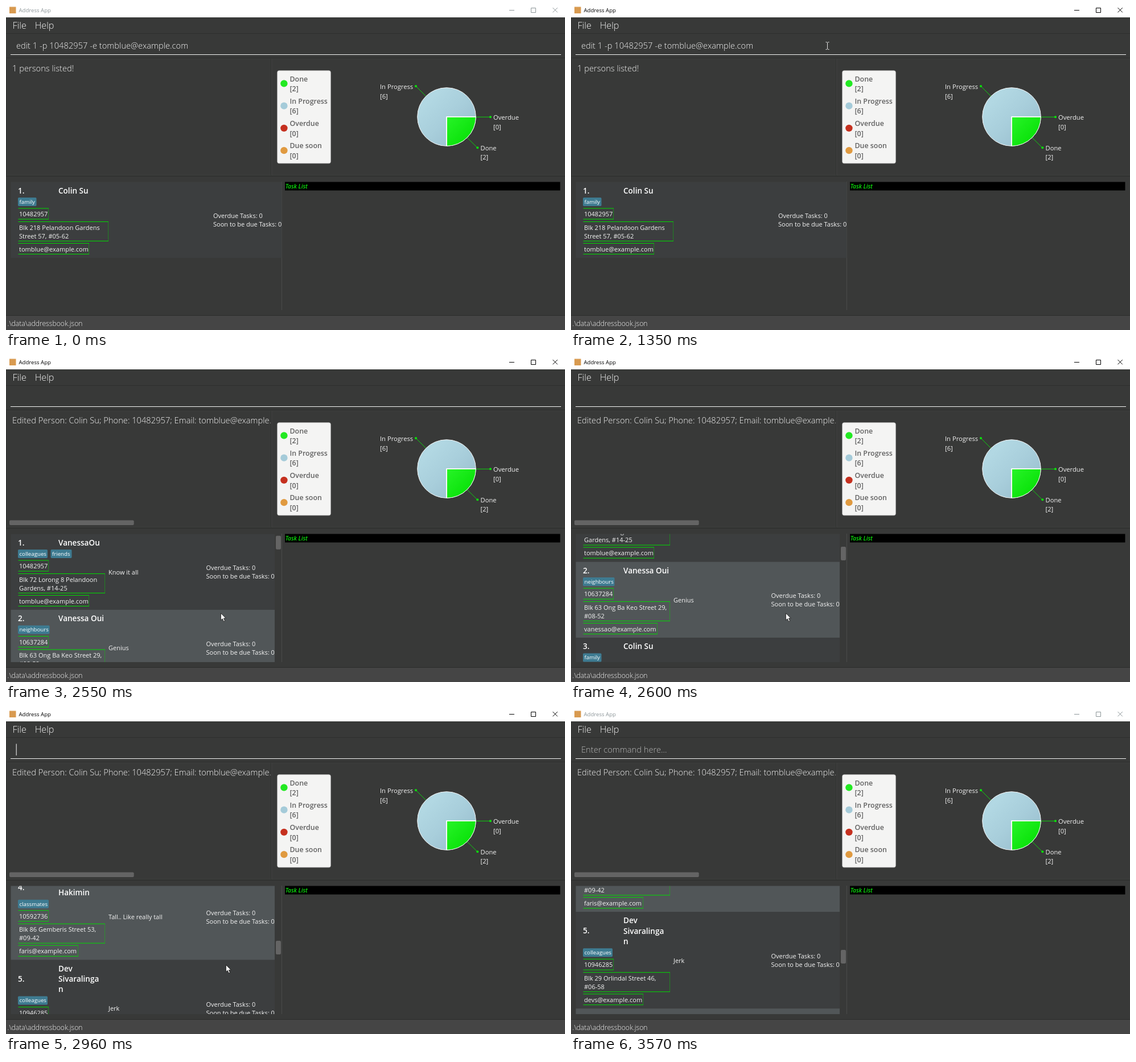
Write an HTML page that moves like this. It is 982 px wide and 570 px high and loops after 3670 ms.

```html
<!DOCTYPE html>
<html lang="en">
<head>
<meta charset="utf-8">
<title>Address App</title>
<style>
html, body { margin: 0; width: 100%; height: 100%; overflow: hidden; background: #383938; }
svg { display: block; width: 982px; height: 570px; font-family: "Open Sans", "Noto Sans", sans-serif; }
text { white-space: pre; }
.menu { font-size: 16.2px; font-weight: 300; fill: #f4f4f4; }
.line { font-size: 14.7px; font-weight: 300; fill: #f4f4f4; }
.name { font-size: 13.55px; font-weight: 600; fill: #fff; }
.small { font-size: 11px; fill: #f4f4f4; }
.tag { font-size: 9.7px; fill: #fff; }
.legend { font-size: 12.4px; font-weight: 600; fill: #626262; }
.label { font-size: 11.2px; fill: #f2f2f2; }
.edge { fill: none; stroke: #00dc00; }
</style>
</head>
<body>
<svg id="stage" viewBox="0 0 982 570"></svg>
<script>
const LOOP = 3670;
const CARET_STEP = 84.4;
const LIME = '#0be40b';

const text = (x, y, cls, s, extra = '') => `<text x="${x}" y="${y}" class="${cls}" ${extra}>${s}</text>`;
const rect = (x, y, w, h, fill, extra = '') =>
  `<rect x="${x}" y="${y}" width="${w}" height="${h}" fill="${fill}" ${extra}/>`;
const dot = (x, y, r, fill) => `<circle cx="${x}" cy="${y}" r="${r}" fill="${fill}"/>`;
const group = (id, body, extra = '') => `<g id="${id}" ${extra}>${body}</g>`;

const PHONE = '10482957', MAIL = 'tomblue@example.com', PERSON = 'Colin Su';

const people = [
  { name: ['VanessaOu'], tags: [['colleagues', 52], ['friends', 37]], phone: PHONE,
    home: ['Blk 72 Lorong 8 Pelandoon', 'Gardens, #14-25'], mail: MAIL, mailEnd: 146, note: 'Know it all' },
  { name: ['Vanessa Oui'], tags: [['neighbours', 55.5]], phone: '10637284',
    home: ['Blk 63 Ong Ba Keo Street 29,', '#08-52'], mail: 'vanessao@example.com', mailEnd: 152, note: 'Genius' },
  { name: [PERSON], tags: [['family', 32.5]], phone: PHONE,
    home: ['Blk 218 Pelandoon Gardens', 'Street 57, #05-62'], mail: MAIL, mailEnd: 146, note: '' },
  { name: ['Faris', 'Hakimin'], tags: [['classmates', 54]], phone: '10592736',
    home: ['Blk 86 Gemberis Street 53,', '#09-42'], mail: 'faris@example.com', mailEnd: 127, note: 'Tall.. Like really tall' },
  { name: ['Dev', 'Sivaralinga', 'n'], tags: [['colleagues', 52]], phone: '10946285',
    home: ['Blk 29 Orlindal Street 46,', '#06-58'], mail: 'devs@example.com', mailEnd: 127, note: 'Jerk' }
];

const cardHeight = p => 133.5 + 18.2 * (p.name.length - 1);

// Field with bright top and bottom rules and a faint right side
function field(y, h, end) {
  return `<path class="edge" d="M21.5 ${y}H${end}M21.5 ${y + h}H${end}"/>` +
    `<path class="edge" stroke-opacity=".55" stroke-width=".8" d="M${end - .4} ${y}V${y + h}"/>`;
}

function card(p, index, top, wide) {
  const h = cardHeight(p), gap = h - 133.5, mid = h / 2;
  const statX = wide ? 364 : 351.5;
  let s = rect(8.5, 0, wide ? 476 : 463.5, h, index % 2 ? '#515658' : '#3c3e3f');
  s += text(21, 20 + gap / 2, 'name', index + 1 + '.');
  p.name.forEach((part, i) => s += text(92, 20 + i * 18.3, 'name', part));
  let x = 21;
  for (const [label, w] of p.tags) {
    s += rect(x, 27.5 + gap, w, 15, '#3e7b91', 'rx="1.7"') + text(x + 2.5, 38.3 + gap, 'tag', label);
    x += w + 5.5;
  }
  const row = (y, str) => text(23, y + gap, 'small', str);
  s += field(46.5 + gap, 19, 75) + row(60.5, p.phone);
  s += field(70 + gap, 34, wide ? 180 : 174) + row(84, p.home[0]) + row(99, p.home[1]);
  s += field(108 + gap, 19, p.mailEnd) + row(122, p.mail);
  s += text(180, mid + 4.5, 'small', p.note);
  s += text(statX, mid - 3, 'small', 'Overdue Tasks: 0');
  s += text(statX, mid + 12, 'small', 'Soon to be due Tasks: 0');
  return `<g transform="translate(0 ${top})">${s}</g>`;
}

function allCards() {
  let y = 0, s = '';
  people.forEach((p, i) => { s += card(p, i, y, false); y += cardHeight(p); });
  return s + rect(8.5, y, 463.5, 133, '#515658');
}

function legend() {
  const rows = [['Done', 2, '#22e922'], ['In Progress', 6, '#a5cbd9'], ['Overdue', 0, '#c5301f'], ['Due soon', 0, '#e09a40']];
  return rect(476.7, 113.8, 93.6, 163, '#f4f4f3', 'rx="3" stroke="#c9c9c9" stroke-width=".8"') +
    rows.map(([name, n, color], i) => {
      const y = i * 39.25;
      return dot(488.4, 136.4 + y, 6.2, color) + text(498.5, 132.6 + y, 'legend', name) +
        text(498.5, 150 + y, 'legend', `[${n}]`);
    }).join('');
}

function pie() {
  const label = (x, y, name, n) => text(x, y, 'label', name) + text(x, y + 16.6, 'label', `[${n}]`);
  return `<path d="M737.5 158.5L720 141M826 195.3H851M810 231.5L828 249.3" stroke="${LIME}" stroke-width=".9" fill="none"/>` +
    dot(720, 141, 2, LIME) + dot(851, 195.3, 2, LIME) + dot(828.3, 249.3, 2, LIME) +
    `<circle cx="774" cy="195" r="51.3" fill="url(#blue)" stroke="#f4f4f4"/>` +
    `<path d="M774 195H825.3A51.3 51.3 0 0 1 774 246.3Z" fill="url(#green)" stroke="#f4f4f4"/>` +
    `<path d="M825 195H774V246" fill="none" stroke="#fff" stroke-width="1.7"/>` +
    label(657, 146, 'In Progress', 6) + label(856, 200.2, 'Overdue', 0) + label(833.5, 253.7, 'Done', 2);
}

const defs = `<defs>
  <linearGradient id="blue" x1="0" y1="0" x2="1" y2="1">
    <stop offset=".2" stop-color="#b2d8e3"/><stop offset=".52" stop-color="#a8cedb"/><stop offset=".9" stop-color="#98bdcd"/>
  </linearGradient>
  <linearGradient id="green" x1="0" y1="0" x2="1" y2="1">
    <stop offset="0" stop-color="#27f427"/><stop offset="1" stop-color="#00dc00"/>
  </linearGradient>
  <clipPath id="listClip"><rect x="8" y="309.5" width="477" height="225.5"/></clipPath>
  <clipPath id="resultClip"><rect x="0" y="93" width="464.5" height="200"/></clipPath>
</defs>`;

document.getElementById('stage').innerHTML = defs +
  rect(0, 0, 982, 570, '#383938') +
  rect(0, 0, 982, 20, '#fff') +
  rect(6, 1.5, 11.5, 11.5, '#d89a50') +
  group('chrome', text(22.5, 10.8, '', 'Address App', 'font-size="9.6" stroke="none" fill="currentColor"') +
    '<path d="M884 7.5H893M922.5 3.5H930.5V11.5H922.5ZM960.5 3L968.8 11.3M968.8 3L960.5 11.3" fill="none" stroke="currentColor"/>') +
  text(11.5, 40, 'menu', 'File') + text(50.7, 40, 'menu', 'Help') +
  rect(0, 48, 982, 1, '#2e2f2e') + rect(8, 85, 967, 1, '#f4f4f4') +
  rect(0, 91, 982, 1.5, '#2d2e2d') + rect(0, 92.5, 982, .8, '#434443') +
  rect(0, 297.5, 982, 1, '#434443') + rect(0, 298.5, 982, 1.5, '#2d2e2d') +
  rect(0, 93, 1, 205, '#2f302f') + rect(465.5, 93, 1, 205, '#2d2e2d') + rect(466.5, 93, .8, 205, '#484948') +
  group('command', text(18, 75.3, 'line', `edit 1 -p ${PHONE} -e ${MAIL}`)) +
  group('prompt', text(18, 75.3, 'line', 'Enter command here...', 'fill-opacity=".68"')) +
  rect(0, 59.5, 1.2, 20.5, '#dcdcdc', 'id="caret"') +
  group('found', text(11, 114.5, 'line', '1 persons listed!')) +
  group('edited', text(11, 114.5, 'line',
    `Edited Person: ${PERSON}; Phone: ${PHONE}; Email: ${MAIL}; Address:`, 'clip-path="url(#resultClip)"') +
    rect(6, 285.5, 218.7, 8.4, '#646464', 'rx="2"')) +
  legend() + pie() +
  rect(484, 309, 1, 226, '#4a4b4a') +
  group('single', card(people[2], 0, 309.5, true)) +
  group('many', `<g clip-path="url(#listClip)">${group('cards', allCards())}</g>` +
    rect(474, 312.7, 9, 24, '#646464', 'rx="2" id="thumb"')) +
  rect(490, 309.5, 483.5, 15, '#000') +
  text(490.7, 321.3, '', 'Task List', `font-size="10.2" font-weight="600" font-style="italic" fill="${LIME}"`) +
  rect(0, 544, 982, 1, '#2d2e2d') + rect(0, 545, 982, 25, '#454545') +
  text(2.5, 562.6, 'line', '.\\data\\addressbook.json', 'style="font-size:12.2px"') +
  group('arrow', '<path d="M.4 .4V12.8L3.3 10.2L5.3 15L7.5 14.1L5.5 9.4H9.3Z" fill="#fff" stroke="#111" stroke-width=".8"/>') +
  group('beam', '<path d="M-3 -6.5Q-.5 -6.5 0 -5.5Q.5 -6.5 3 -6.5M0 -5.5V5.5M-3 6.5Q-.5 6.5 0 5.5Q.5 6.5 3 6.5" fill="none" stroke="#e4e4e4"/>');

const el = id => document.getElementById(id);
const show = (id, on) => el(id).setAttribute('display', on ? 'inline' : 'none');
const move = (id, x, y) => el(id).setAttribute('transform', `translate(${x} ${y})`);

// Pointer path: time, x, y
const route = [
  [80, 942, 527], [180, 862, 435], [280, 690, 270], [380, 535, 130], [480, 456, 74], [530, 450.5, 70],
  [1940, 450.5, 70], [1990, 456, 66], [2092, 474, 59], [2194, 470, 130], [2296, 438, 270], [2398, 397, 395],
  [2500, 379, 451], [2550, 377, 448.5], [2710, 377, 448.5], [2910, 381, 446], [2960, 386, 448],
  [3010, 395, 452], [3060, 440, 463], [3110, 600, 494], [3160, 857, 545], [3210, 857, 545]
];
const rolls = [2600, 2660, 2710, 2910, 2960, 3010];

// The pointer is sampled in short hops
function hop(t) {
  if (t < 580) return 80 + Math.floor((t - 80) / 50) * 50;
  if (t < 1990) return 580;
  if (t < 2550) return 1990 + Math.min(10, Math.floor((t - 1990) / 51)) * 51;
  if (t < 2910) return 2550;
  return 2910 + Math.floor((t - 2910) / 50) * 50;
}

function pointer(t) {
  const u = hop(t);
  let i = 0;
  while (i < route.length - 2 && route[i + 1][0] <= u) i++;
  const [t0, x0, y0] = route[i], [t1, x1, y1] = route[i + 1];
  const k = (u - t0) / (t1 - t0);
  return [x0 + (x1 - x0) * k, y0 + (y1 - y0) * k];
}

function draw(t) {
  const done = t >= 1750;
  const tone = t < 680 || t >= 3570 ? '#8d9699' : t < 760 ? '#4a4f51' : '#000';
  el('chrome').setAttribute('color', tone);

  show('command', !done);
  show('found', !done);
  show('single', !done);
  show('edited', done);
  show('many', done);
  show('prompt', t >= 3570);

  const caretOn = (t >= 840 && t < 1350) || (done && t < 2245) || (t >= 2710 && t < 3210);
  show('caret', caretOn);
  el('caret').setAttribute('x', done ? 17.6 : 315.8);

  const n = rolls.filter(r => t >= r).length;
  move('cards', 0, 309.5 - n * CARET_STEP);
  move('thumb', 0, n < 4 ? n * 19.3 : 77.2 + (n - 4) * 16);

  const here = t >= 80 && t < 3210;
  const [x, y] = pointer(t);
  const typing = y > 49 && y < 91;
  show('beam', here && typing);
  show('arrow', here && !typing);
  move('beam', x, y);
  move('arrow', x, y);
}

const start = performance.now();
function tick() {
  draw((performance.now() - start) % LOOP);
  requestAnimationFrame(tick);
}
tick();
</script>
</body>
</html>
```
